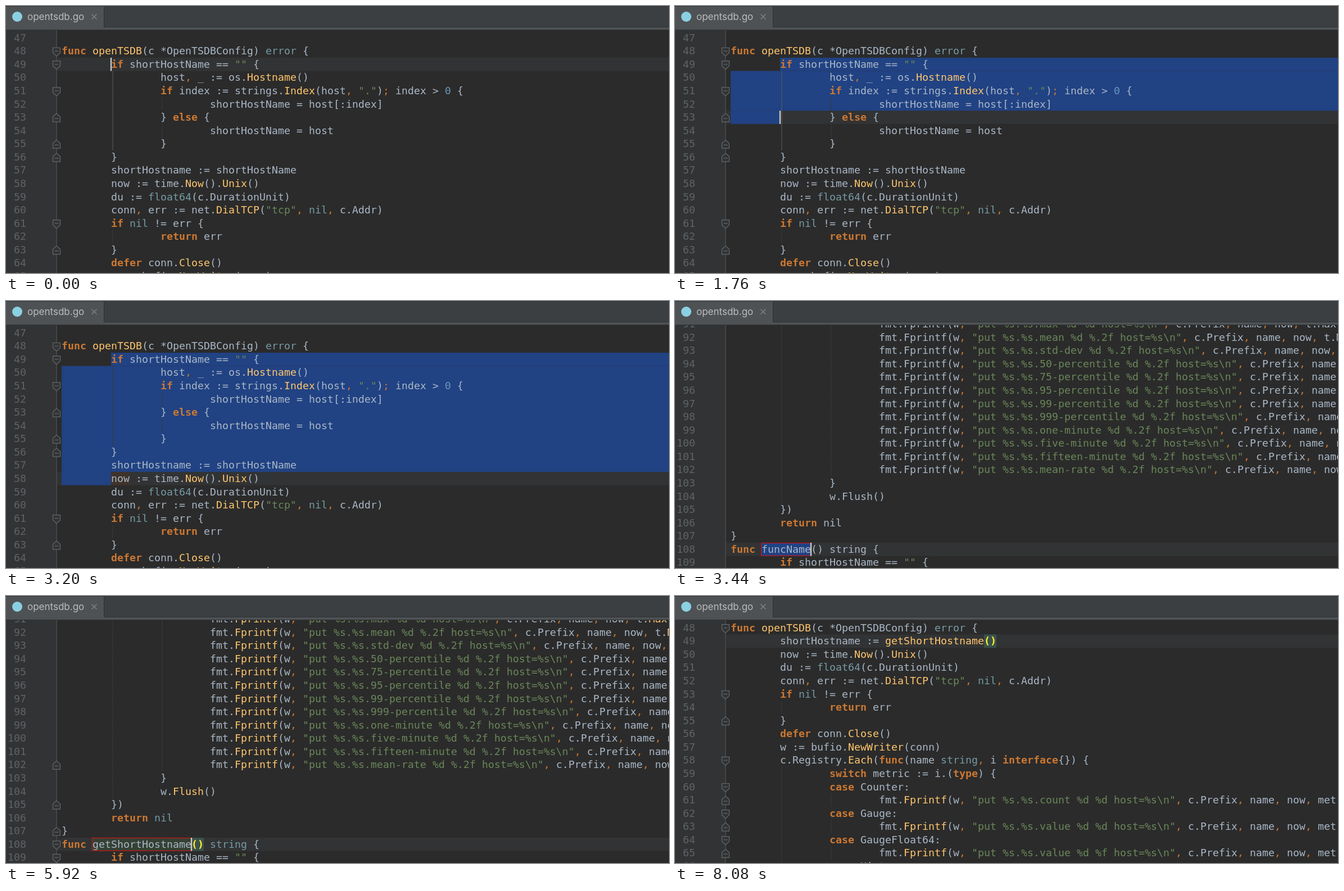
Recreate the animation shown at these times as an HTML page with a canvas. Size 1180x475 px, loop 8.4 s.

```html
<!DOCTYPE html>
<html lang="en">
<head>
<meta charset="utf-8">
<title>Extract method</title>
<style>
html, body { margin: 0; width: 100%; height: 100%; overflow: hidden; background: #2b2b2b; }
canvas { display: block; width: 1180px; height: 475px; }
</style>
</head>
<body>
<canvas id="stage"></canvas>
<script>
const W = 1180, H = 475, LOOP = 8400;
const ROW = 23.57, CELL = 11, LEFT = 99, BAR = 43;
const MONO = '18.27px "DejaVu Sans Mono", monospace';
const C = {
  bg: '#2b2b2b', gutter: '#313335', text: '#a9b7c6', keyword: '#cc7832', string: '#6a8759',
  call: '#ffc66d', builtin: '#769aa5', number: '#6897bb', lineNo: '#606366', row: '#323334',
  select: '#214283', guide: '#393a3b', guideOn: '#5a5d5f', fold: '#65686a', caret: '#c9c9c9',
  brace: '#ffef28', braceBg: '#3b514d', write: '#40332b', read: '#344134', tab: '#4e5254', head: '#3c3f41'
};
const KEYWORDS = new Set('func if else return defer switch case type interface'.split(' '));
const BUILTINS = new Set('error string nil float64'.split(' '));

const canvas = document.getElementById('stage');
const dpr = window.devicePixelRatio || 1;
canvas.width = W * dpr;
canvas.height = H * dpr;
const g = canvas.getContext('2d');
g.scale(dpr, dpr);

// The leading digit of each code line is its tab depth.
const print = (stat, verb, value) =>
  String.raw`3fmt.Fprintf(w, "put %s.%s.${stat} %d ${verb} host=%s\n", c.Prefix, name, now, ${value}, shortHostname)`;

const head = '0func openTSDB(c *OpenTSDBConfig) error {';
const body = [
  '1now := time.Now().Unix()',
  '1du := float64(c.DurationUnit)',
  '1conn, err := net.DialTCP("tcp", nil, c.Addr)',
  '1if nil != err {',
  '2return err',
  '1}',
  '1defer conn.Close()',
  '1w := bufio.NewWriter(conn)'
];
const before = [
  '', head,
  '1if shortHostName == "" {',
  '2host, _ := os.Hostname()',
  '2if index := strings.Index(host, "."); index > 0 {',
  '3shortHostName = host[:index]',
  '2} else {',
  '3shortHostName = host',
  '2}',
  '1}',
  '1shortHostname := shortHostName',
  ...body
];
const after = [
  '', head,
  '1shortHostname := getShortHostname()',
  ...body,
  '1c.Registry.Each(func(name string, i interface{}) {',
  '2switch metric := i.(type) {',
  '2case Counter:',
  print('count', '%d', 'metric.Count()'),
  '2case Gauge:',
  print('value', '%d', 'metric.Value()'),
  '2case GaugeFloat64:',
  print('value', '%f', 'metric.Value()'),
  '2case Histogram:'
];
const tail = name => [
  print('max', '%d', 't.Max()'),
  print('mean', '%.2f', 't.Mean()'),
  print('std-dev', '%.2f', 't.StdDev()'),
  ...[50, 75, 95, 99, 999].map((p, i) => print(p + '-percentile', '%.2f', `ps[${i}]`)),
  ...['one', 'five', 'fifteen'].map(n => print(n + '-minute', '%.2f', 't.Rate()')),
  print('mean-rate', '%.2f', 't.RateMean()'),
  '2}', '2w.Flush()', '1})', '1return nil', '0}',
  `0func ${name}() string {`,
  '1if shortHostName == "" {'
];

const FOLD_BEFORE = { down: [48, 49, 51, 61], up: [53, 55, 56, 63] };
const FOLD_TAIL = { down: [108, 109], up: [102, 105, 107] };
const FOLD_AFTER = { down: [48, 53, 58, 60, 62, 64], up: [55, 61, 63, 65] };

const DOWN_KEYS = [1280, 1600, 1680, 1760, 1840, 1920, 2000, 2080, 2160];
const TYPED = 'getShortHostname';
const TYPE_KEYS = [4000, 4160, 4480, 4560, 4640, 4720, 4880, 5040, 5200, 5360, 5520, 5680, 5760, 5840, 5840, 5920];

const passed = (times, t) => times.filter(x => x <= t).length;
const colX = c => LEFT + c * CELL;

function box(x, y, w, h, color) {
  g.fillStyle = color;
  g.fillRect(x, y, w, h);
}

function codeLine(src, y, opt, braces) {
  const depth = +src[0], code = src.slice(1);
  for (const m of code.matchAll(/"[^"]*"|[A-Za-z_]\w*|\d+|\S/g)) {
    const word = m[0], col = depth * 8 + m.index;
    let color = C.text, bold = false;
    if (braces && (col === braces || col === braces + 1)) {
      color = C.brace;
      bold = true;
    } else if (KEYWORDS.has(word)) {
      color = C.keyword;
      bold = true;
    } else if (word[0] === '"') color = C.string;
    else if (word === ',' || word === ';') color = C.keyword;
    else if (/^\d/.test(word)) color = C.number;
    else if (!opt.raw && BUILTINS.has(word)) color = C.builtin;
    else if (!opt.raw && /^\w/.test(word) && code[m.index + word.length] === '(' && word !== opt.name) color = C.call;
    g.font = (bold ? 'bold ' : '') + MONO;
    g.fillStyle = color;
    g.fillText(word, colX(col), y + 17.8);
  }
}

function foldMark(top, up) {
  const y = top + 12.8, s = up ? -1 : 1;
  g.beginPath();
  [[-6.5, -7], [6.5, -7], [6.5, 2], [0, 8], [-6.5, 2]].forEach(([dx, dy]) => g.lineTo(90 + dx, y + dy * s));
  g.closePath();
  g.fillStyle = C.gutter;
  g.strokeStyle = C.fold;
  g.lineWidth = 1.2;
  g.fill();
  g.stroke();
  box(86.5, y - s - 0.6, 7, 1.2, C.fold);
}

function header() {
  box(0, 0, W, BAR, C.head);
  box(0, 37, W, 1, '#303234');
  box(0, 38, W, 4, C.tab);
  box(0, 42, W, 1, '#323435');
  box(0, 0, 174, 38, C.tab);
  box(174, 1, 1, 37, '#2d2f31');
  box(0, 0, W, 1, '#303234');
  g.fillStyle = '#8bd0e2';
  g.beginPath();
  g.arc(20, 19, 9, 0, Math.PI * 2);
  g.fill();
  g.font = '17px Inter, "Open Sans", sans-serif';
  g.fillStyle = '#bbbbbb';
  g.fillText('opentsdb.go', 38, 25);
  g.strokeStyle = '#7d8183';
  g.lineWidth = 1.5;
  g.beginPath();
  g.moveTo(152.5, 14.5); g.lineTo(161.5, 23.5);
  g.moveTo(161.5, 14.5); g.lineTo(152.5, 23.5);
  g.stroke();
}

function editor(v) {
  const top = n => v.top + (n - v.first) * ROW;
  const { line, col } = v.caret;
  box(0, 0, W, H, C.bg);
  box(0, 0, 90, H, C.gutter);
  box(91, top(line), W - 91, ROW, C.row);

  if (v.selectTo) {
    box(colX(8), top(49), W, ROW, C.select);
    box(LEFT, top(50), W, (v.selectTo - 50) * ROW, C.select);
    box(LEFT, top(v.selectTo), 8 * CELL, ROW, C.select);
  }
  for (const m of v.marks || []) box(colX(m.col), top(line), m.len * CELL, ROW, m.color);

  v.lines.forEach((src, i) => {
    const n = v.first + i;
    for (let d = 1; d < +src[0]; d++) {
      const lit = d === 1 && v.litGuide && n >= 50 && n <= 55;
      box(colX(d * 8) + 2.5, top(n), 1, ROW, lit ? C.guideOn : C.guide);
    }
  });

  box(89.5, BAR, 1, H, '#585b5d');
  if (v.folds) {
    v.folds.down.forEach(n => foldMark(top(n), false));
    v.folds.up.forEach(n => foldMark(top(n), true));
  }

  v.lines.forEach((src, i) => {
    const n = v.first + i, y = top(n);
    g.font = MONO;
    g.fillStyle = C.lineNo;
    g.textAlign = 'right';
    g.fillText(n, 36, y + 17.8);
    g.textAlign = 'left';
    if (src) codeLine(src, y, v, n === line && v.braces);
  });

  if (v.frame) {
    g.strokeStyle = '#d01414';
    g.lineWidth = 1.2;
    g.strokeRect(colX(5) - 0.5, top(line) + 0.5, v.frame * CELL + 1, ROW - 1);
  }
  if (v.caret.on) box(colX(col) - 1.2, top(line), 2.4, ROW, C.caret);
  header();
}

function selecting(t) {
  const n = passed(DOWN_KEYS, t);
  const line = 49 + n;
  const on = t < 1280 ? Math.floor(t / 320) % 2 === 0 : t < 2480;
  return {
    lines: before, first: 47, top: 92 - 2 * ROW, folds: FOLD_BEFORE,
    selectTo: n ? line : 0, litGuide: line < 57,
    marks: t >= 2400 ? [{ col: 8, len: 3, color: C.write }] : [],
    caret: { line, col: 8, on }
  };
}

function naming(t) {
  const n = passed(TYPE_KEYS, t);
  const name = n ? TYPED.slice(0, n) : 'funcName';
  const raw = t < 3600, end = 5 + name.length;
  const marks = [{ col: 5, len: name.length, color: n ? C.read : C.select }];
  if (!raw) marks.push({ col: end, len: 2, color: C.braceBg });
  return {
    lines: tail(name), first: 91, top: 430 - 17 * ROW, folds: raw ? null : FOLD_TAIL,
    raw, name, marks, braces: raw ? 0 : end, frame: name.length,
    caret: { line: 108, col: end, on: t < 6240 }
  };
}

function done(t) {
  return {
    lines: after, first: 47, top: 92 - 3 * ROW, folds: FOLD_AFTER,
    marks: [{ col: 41, len: 2, color: C.braceBg }], braces: 41,
    caret: { line: 49, col: 43, on: t < 7440 || (t >= 7760 && t < 8080) }
  };
}

const start = performance.now();
function draw() {
  const t = (performance.now() - start) % LOOP;
  editor(t < 3360 ? selecting(t) : t < 6480 ? naming(t) : done(t));
  requestAnimationFrame(draw);
}
draw();
</script>
</body>
</html>
```
